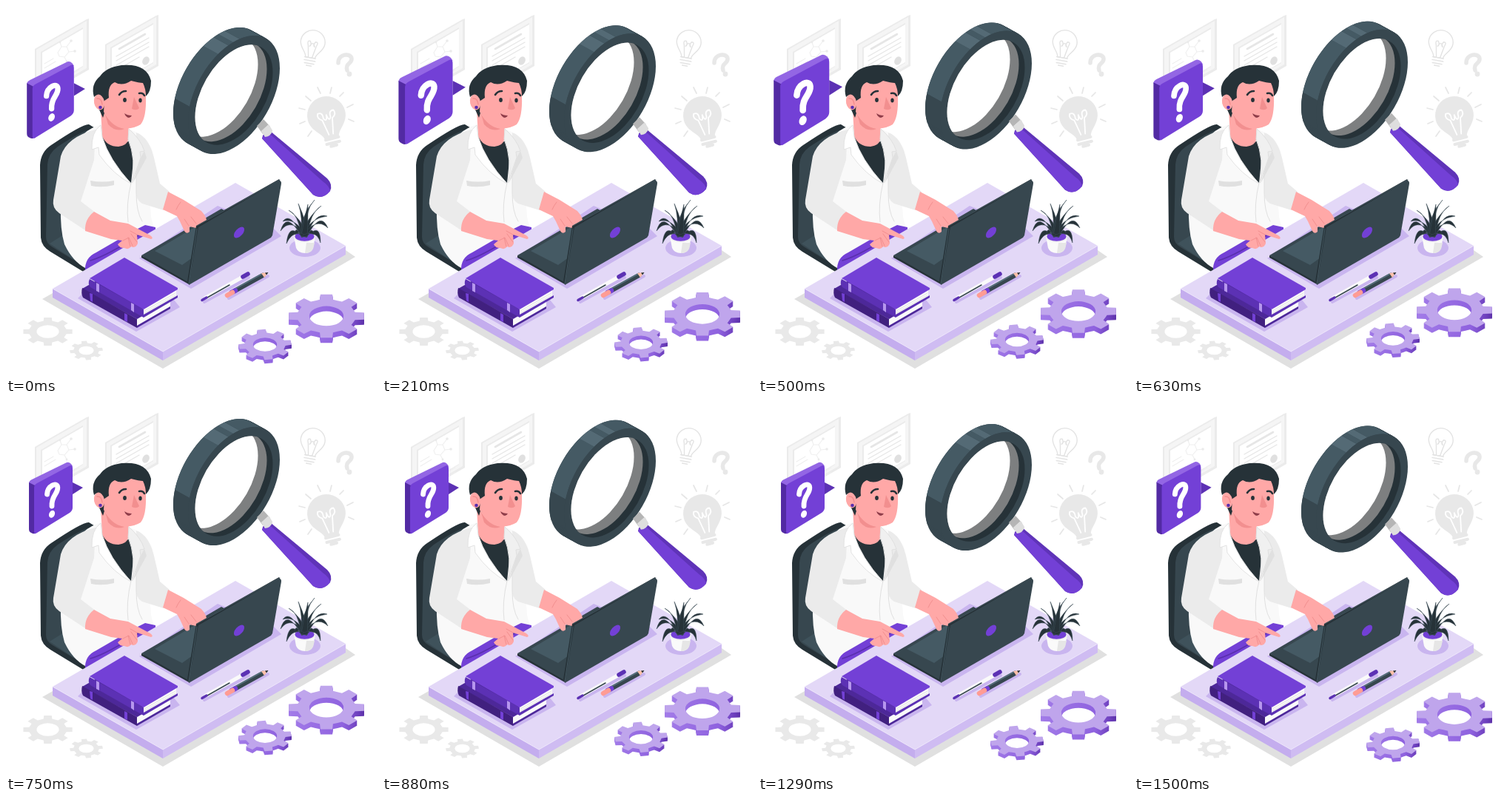
An HTML page that plays this animation: 500x500 px, repeating every 1540 ms.

```html
<!DOCTYPE html>
<html lang="en">
<head>
<meta charset="utf-8">
<title>Research desk</title>
<style>
html, body { margin: 0; width: 100%; height: 100%; overflow: hidden; background: #fff; }
svg { display: block; width: 100%; height: 100%; }
.line { fill: none; stroke-linecap: round; stroke-linejoin: round; }
</style>
</head>
<body>
<svg viewBox="0 0 500 500">
<defs>
  <linearGradient id="side">
    <stop offset="0" stop-color="#a27be8"/><stop offset=".72" stop-color="#8f62df"/>
    <stop offset=".94" stop-color="#6a3cba"/><stop offset="1" stop-color="#5c31a8"/>
  </linearGradient>
  <ellipse id="hole" rx="42.9" ry="74.2" transform="rotate(30)"/>
  <clipPath id="lens"><use href="#hole"/></clipPath>
</defs>

<!-- wall pictures -->
<g id="pictures">
  <path fill="#ebebeb" d="M39 58 109 18 112 17V86L42 126 39 125Z"/>
  <path fill="#f5f5f5" d="M41 59 109 20V84L41 123Z"/>
  <path fill="#ebebeb" d="M47 62 104 29V82L47 115Z"/>
  <path fill="#fff" d="M49 63 104 31V81L49 113Z"/>
  <g class="line" stroke="#efefef" stroke-width="1.1">
    <path d="M52 78 64 71M52 84 67 75M70 63 75 55 82 55 85 62 79 69 72 68ZM82 55 88 47M85 62 93 61M75 55 73 49M79 69 82 75M88 92 99 86M88 98 99 92"/>
  </g>
  <g fill="#ebebeb"><circle cx="88" cy="47" r="1.8"/><circle cx="93" cy="61" r="1.8"/><circle cx="73" cy="49" r="1.4"/><circle cx="82" cy="75" r="1.4"/></g>
  <path fill="#ebebeb" d="M134 52 203 13 206 12V81L136 121 134 120Z"/>
  <path fill="#f5f5f5" d="M136 53 203 15V79L136 118Z"/>
  <path fill="#ebebeb" d="M141 56 199 23V77L141 110Z"/>
  <path fill="#fff" d="M143 57 199 25V76L143 108Z"/>
  <g class="line" stroke="#e6e6e6"><path stroke-width="2.6" d="M153 58 188 38"/><path stroke-width="1.3" d="M149 68 193 43M149 74 193 49M149 80 193 55M154 84 180 69"/></g>
  <ellipse cx="189" cy="74" rx="4.5" ry="6" transform="rotate(28 189 74)" fill="#e0e0e0"/>
</g>

<!-- bulbs and small question mark -->
<g class="line" stroke="#e3e3e3" stroke-width="1.4">
  <g transform="rotate(10 414 50)">
    <path d="M408 70C408 63 398 59 398 49A16.5 16.5 0 0 1 431 49C431 59 421 63 421 70Z"/>
    <path d="M407 70H422M407 74H422M408 78H421M411 81H418M412 70 409 54Q406 47 411 48Q414 53 411 55M411 55Q415 46 418 55M417 70 420 54Q423 47 418 48Q415 53 418 55"/>
  </g>
</g>
<g transform="rotate(-14 433 148)">
  <path fill="#e8e8e8" d="M423 179C423 171 407 164 407 148A26 26 0 0 1 459 148C459 164 443 171 443 179Z"/>
  <g class="line" stroke="#e8e8e8" stroke-width="4"><path d="M424 180H442M424 186H442M429 190H437"/></g>
  <path class="line" stroke="#fff" stroke-width="1.8" d="M430 174 426 153Q419 149 422 143Q429 142 428 151Q432 158 433 147Q435 158 438 151Q437 142 444 143Q447 149 440 153L436 174"/>
</g>
<path class="line" stroke="#e6e6e6" stroke-width="1.7" d="M438 118 440 110M451 122 456 117M461 137 469 133M463 153 470 156M425 118 421 110M412 128 405 122M404 140 396 138M404 156 397 159M413 169 408 176"/>
<path class="line" stroke="#e8e8e8" stroke-width="5.5" stroke-linecap="butt" d="M449 77C449 64 466 63 467 71C468 78 458 77 461 87"/>
<circle cx="464" cy="92" r="3.4" fill="#e8e8e8"/>
<g id="greys"></g>

<!-- chair -->
<path fill="#263238" d="M122 166 112 160Q104 159 61 188Q47 197 46 215L47 313Q48 325 60 332L106 360 121 350Z"/>
<path fill="#37474f" d="M122 167Q111 163 70 190Q57 199 56 214L54 312Q54 321 63 326L111 355 130 330Z"/>
<path fill="#455a64" d="M59 321 78 309 92 343Z" opacity=".6"/>

<!-- body -->
<path fill="#f9f9f9" d="M129 160Q100 168 92 195L74 270Q73 302 79 322Q90 345 107 354L200 302 196 285 193 240 198 196Q188 172 166 167Z"/>
<path fill="#7340d6" d="M107 358Q106 340 122 333L172 304 188 296 202 299 202 310 116 362Z"/>
<path class="line" stroke="#5a2fae" stroke-width="1.5" d="M114 344Q138 337 182 308"/>
<path fill="#ebebeb" d="M121 167Q82 177 74 203L64 262Q62 273 72 280L107 303 122 280 101 264 119 208Z"/>
<path fill="#ebebeb" d="M176 171Q193 177 200 205L208 240 221 251 213 276 184 267Q175 262 176 250Z"/>
<path class="line" stroke="#e0e0e0" stroke-width="1" d="M169 239Q162 268 165 292M176 225V252Q176 278 184 291"/>
<path fill="#e0e0e0" d="M114 236Q130 239 146 236V242Q130 246 115 243ZM187 196 190 205 171 240 182 205Z"/>
<path fill="#263238" d="M130 176Q148 195 170 180L172 210 169 239Q142 214 130 176Z"/>
<path fill="#ffa8a7" d="M128 140 130 176Q136 190 152 190Q164 188 165 181L166 158Z"/>
<path fill="#f28f8f" d="M134 146Q143 163 160 166Q148 171 138 160Z"/>
<path fill="#fff" stroke="#e3e3e3" d="M128 161Q115 170 116 194L125 191 126 201Q145 228 169 240Q139 207 130 177Z"/>
<path fill="#f0f0f0" stroke="#e0e0e0" d="M166 166Q182 180 187 196L181 197 182 205 170 239Q176 207 165 180Z"/>

<!-- head -->
<path fill="#263238" d="M125 138 131 151 137 132Z"/>
<path fill="#263238" d="M119 123Q114 106 127 95Q135 83 156 80Q190 77 196 101Q196 116 189 122L132 129Q126 116 119 123Z"/>
<path fill="#ffa8a7" d="M133 128 139 124Q137 107 147 103Q157 109 169 101Q180 104 185 104Q189 112 189 122Q190 150 182 160Q171 167 158 165Q141 160 132 143Z"/>
<ellipse cx="126" cy="130" rx="7" ry="10.5" fill="#ffa8a7" transform="rotate(-12 126 130)"/>
<path class="line" stroke="#f28f8f" stroke-width="1.5" d="M123 125Q129 124 130 133"/>
<circle cx="127.5" cy="137" r="2.3" fill="#5a2fae"/>
<g fill="#263238"><ellipse cx="160.5" cy="127" rx="2.4" ry="3"/><ellipse cx="181.5" cy="127.5" rx="2.2" ry="3"/></g>
<path class="line" stroke="#263238" stroke-width="2.6" d="M153 120Q156 115 162 115M180 118Q185 117 187 121"/>
<path fill="#f28f8f" d="M173 123 180 138Q177 142 170 139Z"/>
<path fill="#8f3d4a" d="M160 145Q164 148 170 148Q168 152 164 150.500Q161 149 160 145Z"/>

<!-- desk -->
<path fill="#e0e0e0" d="M49 396 63 388 212 470 459 330 472 339 212 490Z"/>
<path fill="#e3d8f7" d="M63 382 310 239 459 324 212 467Z"/>
<path fill="#c4adee" d="M63 382 212 467V479L63 394Z"/>
<path fill="#cfbcf2" d="M212 467 459 324V336L212 479Z"/>
<path class="line" stroke="#f0eafb" stroke-width=".8" d="M63 382 212 467 459 324"/>

<!-- plant -->
<ellipse cx="404" cy="327" rx="21" ry="12" fill="#c9b5ef"/>
<path fill="#fafafa" d="M389 311 392 327Q395 334 404 334Q413 334 415 327L418 311Z"/>
<path fill="#e6e6e6" d="M406 320H417L415 328Q412 334 404 334Z"/>
<ellipse cx="403.5" cy="312" rx="14.5" ry="7.500" fill="#f0f0f0"/>
<ellipse cx="403.5" cy="311.500" rx="13" ry="6.2" fill="#7340d6"/>
<g id="leaves"></g>

<!-- laptop -->
<path fill="#c9b5ef" d="M180 341 250 382 372 311 362 301 286 270Z"/>
<path fill="#263238" d="M183 337V340L247 376 252 370Z"/>
<path fill="#37474f" d="M183 337 291 274 345 303 246 373Z"/>
<path fill="#455a64" d="M201 331 285 281 298 287 257 311 252 340 238 350Z"/>

<!-- typing hands -->
<path fill="#ffa8a7" d="M219 251 240 262 264 277Q273 287 271 294L257 300 248 298 248 305Q244 309 241 304L235 291 231 284 212 275Z"/>
<path class="line" stroke="#f28f8f" d="M241 288 247 297M250 285 257 294M236 265Q232 270 230 275"/>
<path fill="#ffa8a7" d="M119 278 141 290 165 294 195 310Q200 314 196 315L177 309 178 321Q175 328 169 325Q166 330 160 327Q153 327 151 322L157 317 142 315 107 304Q106 288 119 278Z"/>
<path class="line" stroke="#f28f8f" d="M158 317 166 313 171 324M165 313 168 325M169 308 177 319M177 309 168 304"/>

<path fill="#263238" d="M257 297 369 234 372 239 260 302 248 377 245 372Z"/>
<path fill="#37474f" d="M260 299 369 236Q372 236 372 240L360 310 358 313 247 377Z"/>
<path class="line" stroke="#4b606a" stroke-width=".8" d="M258 297 370 235M258 301 247 375"/>
<ellipse cx="315" cy="306" rx="5" ry="9" transform="rotate(42 315 306)" fill="#7340d6"/>

<!-- books -->
<path fill="#c9b5ef" d="M97 395 176 440 235 407 222 391 112 380Z"/>
<path fill="#4d2899" d="M103 382 149 356 222 397 177 423Z"/>
<path fill="#fafafa" d="M176 424 222 398V406L177 432Z"/>
<path fill="#41207f" d="M103 381 177 423V435L104 394Q101 388 103 381Z"/>
<path fill="#4d2899" d="M177 432 222 406V409L177 435Z"/>
<path fill="#7340d6" d="M113 388 114 398 117 400V389ZM160 415V425L164 427V417Z"/>
<path fill="#fafafa" d="M185 409 230 383V392L186 418Z"/>
<path class="line" stroke="#dcdcdc" stroke-width=".8" d="M187 412 229 388M187 415 229 391"/>
<path fill="#5c31b4" d="M113 369 186 410V421L114 380Q110 375 113 369Z"/>
<path fill="#5c31b4" d="M186 417 232 391V394L186 421Z"/>
<path fill="#7340d6" d="M113 368 160 340 232 381V383L186 410Z"/>
<path fill="#b696ee" d="M122 374V385L126 387V376ZM169 401V411L173 414V403Z"/>

<!-- pen and pencil -->
<g class="line" stroke-linecap="butt">
  <path stroke="#c9b5ef" stroke-width="4" d="M268 400 328 367M301 395 354 365"/>
  <path stroke="#fafafa" stroke-width="5" d="M270 394 320 366"/>
  <path stroke="#37474f" stroke-width="1.5" d="M272 394 302 377"/>
  <path stroke="#5c31b4" stroke-width="3.500" d="M265 397.500 271 394"/>
  <path stroke="#5c31b4" stroke-width="5.500" d="M320 366 327 362"/>
  <path stroke="#37474f" stroke-width="6.5" d="M309 385 347 364"/>
  <path stroke="#56707c" stroke-width="1.8" d="M308 383 346 362"/>
  <path stroke="#7340d6" stroke-width="6.5" d="M305 387 310 384.500"/>
  <path stroke="#ff9c94" stroke-width="6.500" d="M299 391 306 387"/>
</g>
<path fill="#ffc0a8" d="M345 361 354 360 349 367Z"/>
<path fill="#263238" d="M350 360.500 354.500 360 352 363.500Z"/>

<g id="float">
  <!-- magnifier -->
  <g transform="translate(308 120)">
    <g id="rim"></g>
    <ellipse rx="50.600" ry="87.700" transform="rotate(30)" fill="#37474f"/>
    <use href="#hole" fill="#263238"/>
    <g clip-path="url(#lens)">
      <use href="#hole" x="-8" y="-4.500" fill="#7d7f80"/>
      <use href="#hole" x="-20" y="-11" fill="#fff"/>
    </g>
  </g>
  <path fill="#b5b5b5" d="M339 162 348 153 357 163 347 173Z"/>
  <path fill="#dedede" d="M345 169 355 160 360 168Q359 176 350 177Z"/>
  <path fill="#5f33b8" d="M346 179Q347 170 357 169L434 233Q442 241 438 250Q427 263 415 255Z"/>
  <path fill="#7340d6" d="M346 179Q348 173 354 173L359 175 428 237Q437 243 438 250Q427 263 415 255Z"/>
  <path fill="#dedede" d="M345 169 355 160 360 169Q358 176 350 177Z"/>
  <g id="gears"></g>
</g>

<!-- question bubble -->
<g id="bubble">
  <path fill="#9366e4" d="M31 107Q31 104 35 102L82 79Q85 78 88 81L90 84 38 112Z"/>
  <path fill="#522aa3" d="M31 106 39 110V175Q37 176 34 174Q31 173 31 169Z"/>
  <path fill="#7340d6" d="M38 113Q38 109 42 107L85 84Q90 81 90 87V140Q90 144 86 147L42 174Q38 177 38 172Z"/>
  <path fill="#5c31b4" d="M90 106 104 113 90 122Z"/>
  <path class="line" stroke="#fff" stroke-width="6.8" stroke-linecap="butt" d="M55.500 122C56 110.500 69 104.500 69.800 112.500C70.500 121.500 61 124 62 138"/>
  <ellipse cx="62" cy="148.800" rx="3.800" ry="5.200" transform="rotate(25 62 148.800)" fill="#fff"/>
</g>
</svg>

<script>
const LOOP = 1540;
const get = id => document.getElementById(id);

function add(parent, tag, attrs) {
  const el = document.createElementNS("http://www.w3.org/2000/svg", tag);
  for (const k in attrs) el.setAttribute(k, attrs[k]);
  return parent.appendChild(el);
}

// Eight-toothed wheel lying flat, seen from above at an isometric angle
function gearPath(cx, cy, r, turn) {
  const flat = 0.577, pts = [];
  for (let i = 0; i < 8; i++) {
    for (const [off, k] of [[-13, .77], [-9, 1], [9, 1], [13, .77], [22.5, .76]]) {
      const a = (i * 45 + off + turn) * Math.PI / 180;
      pts.push((cx + r * k * Math.cos(a)).toFixed(2) + " " + (cy + r * k * Math.sin(a) * flat).toFixed(2));
    }
  }
  const h = r * .45, v = h * flat;
  return `M${pts.join("L")}ZM${cx - h} ${cy}a${h} ${v} 0 1 0 ${2 * h} 0a${h} ${v} 0 1 0 ${-2 * h} 0Z`;
}

function gear(parent, cx, cy, r, turn, depth, fill) {
  const d = gearPath(cx, cy, r, turn);
  for (let y = depth; y > 0; y--)
    add(parent, "path", { d, fill: "url(#side)", "fill-rule": "evenodd", transform: `translate(0 ${y})` });
  add(parent, "path", { d, fill, "fill-rule": "evenodd" });
}

gear(get("greys"), 56.5, 440, 33.5, 0, 0, "#e9e9e9");
gear(get("greys"), 108.5, 465.5, 22.5, -8, 0, "#e9e9e9");
gear(get("gears"), 433, 419, 51.5, 0, 7, "#bfa5ec");
gear(get("gears"), 350, 457.5, 36, -8, 5, "#bfa5ec");

// Thick side of the lens rim, with a few lighter facets
function rimPoint(deg, k) {
  const a = deg * Math.PI / 180, q = Math.PI / 6;
  const x = 50.6 * Math.cos(a), y = 87.7 * Math.sin(a);
  return [x * Math.cos(q) - y * Math.sin(q) - 20 * k, x * Math.sin(q) + y * Math.cos(q) - 11 * k];
}
const rim = get("rim");
for (let k = 1; k > 0; k -= .05)
  add(rim, "ellipse", { rx: 50.6, ry: 87.7, fill: "#37474f", transform: `translate(${-20 * k} ${-11 * k}) rotate(30)` });
for (const [from, to, fill] of [[150, 205, "#455a64"], [205, 218, "#546a75"], [218, 224, "#455a64"], [224, 232, "#546a75"], [232, 262, "#455a64"], [118, 150, "#37474f"]]) {
  const pts = [];
  for (let i = 0; i <= 12; i++) pts.push(rimPoint(from + (to - from) * i / 12, 1));
  for (let i = 12; i >= 0; i--) pts.push(rimPoint(from + (to - from) * i / 12, 0));
  add(rim, "polygon", { points: pts.join(" "), fill });
}

// Leaves: tip x, tip y, bend x, bend y
for (const [x, y, bx, by] of [
  [371, 304, 379, 276], [374, 291, 385, 277], [382, 276, 395, 281], [395, 267, 401, 285],
  [417, 262, 403, 276], [426, 270, 411, 279], [434, 284, 417, 278], [435, 300, 425, 276],
  [379, 321, 382, 292], [425, 320, 425, 292], [408, 268, 402, 290], [390, 309, 391, 295], [417, 309, 413, 296]
]) {
  const n = bx < 403 ? 1 : -1;
  add(get("leaves"), "path", {
    d: `M${403 - n * 4} 311Q${bx} ${by} ${x} ${y}Q${bx + n * 6} ${by + 8} ${403 + n * 4} 312Z`,
    fill: "#263238", stroke: "#3d4f58", "stroke-width": .5
  });
}

const beats = [[0, 1], [210, 1.32], [400, 1.02], [580, 1.32], [750, 1], [LOOP, 1]];

function beat(p) {
  const i = beats.findIndex(b => b[0] > p);
  const [t0, a] = beats[i - 1], [t1, b] = beats[i];
  return a + (b - a) * (p - t0) / (t1 - t0);
}

function draw(ms) {
  const p = (ms + 50) % LOOP;
  const lift = 10 * (1 - Math.abs(2 * p / LOOP - 1));
  get("float").setAttribute("transform", `translate(0 ${(.65 - lift).toFixed(3)})`);
  get("bubble").setAttribute("transform", `translate(67 127) scale(${beat(p).toFixed(4)}) translate(-67 -127)`);
}

const start = performance.now();
function tick() {
  draw(performance.now() - start);
  requestAnimationFrame(tick);
}
draw(0);
requestAnimationFrame(tick);
</script>
</body>
</html>
```
